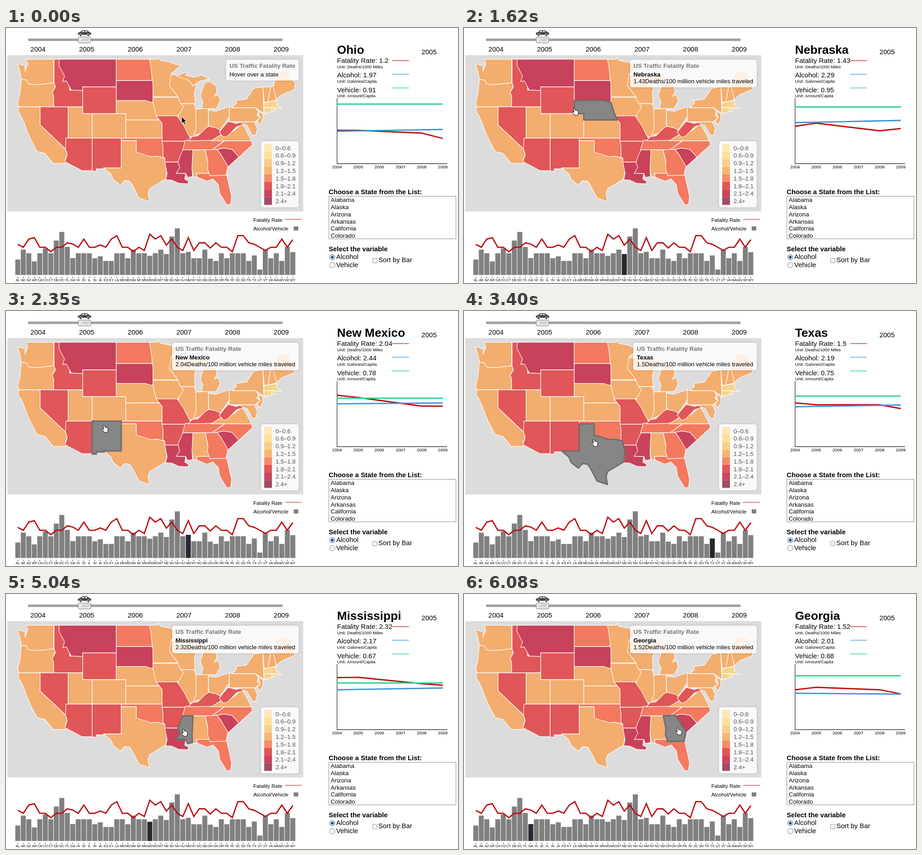
These frames come from a looping animation (996 by 563 pixels, 8000 ms). An HTML page:

```html
<!DOCTYPE html>
<html lang="en">
<head>
<meta charset="utf-8">
<title>US Traffic Fatality Rate</title>
<style>
html, body { margin: 0; width: 100%; height: 100%; overflow: hidden; background: #fff; }
body, svg text { font-family: "Liberation Sans", Arial, sans-serif; }
#stage { position: absolute; left: 0; top: 0; width: 996px; height: 563px; overflow: hidden; }
svg { position: absolute; left: 0; top: 0; }
.panel { position: absolute; right: 351px; background: rgba(255,255,255,.82); border-radius: 5px;
  box-shadow: 0 0 5px rgba(0,0,0,.16); }
#tip { top: 70px; padding: 5.5px 7.7px; font-size: 13.2px; line-height: 15px; white-space: nowrap; }
#tip h4 { margin: 0 0 4.7px; font-size: 13.3px; color: #777; }
#key { top: 250px; left: 562px; height: 146px; width: 83px; }
</style>
</head>
<body>
<div id="stage">
<svg id="back" width="996" height="563"></svg>
<div class="panel" id="tip"></div>
<div class="panel" id="key"></div>
<svg id="front" width="996" height="563"></svg>
</div>
<script>
const $ = id => document.getElementById(id);
const back = $('back'), front = $('front');

function add(parent, tag, attrs, content) {
  const el = document.createElementNS('http://www.w3.org/2000/svg', tag);
  for (const k in attrs) el.setAttribute(k, attrs[k]);
  if (content !== undefined) el.textContent = content;
  parent.appendChild(el);
  return el;
}
const text = (x, y, size, str, more) => add(front, 'text', { x, y, 'font-size': size, ...more }, str);
const line = (x1, y1, x2, y2, stroke, w = 1) =>
  add(front, 'line', { x1, y1, x2, y2, stroke, 'stroke-width': w });
const rect = (parent, x, y, width, height, fill, more) =>
  add(parent, 'rect', { x, y, width, height, fill, ...more });
const curve = (stroke, points = '') =>
  add(front, 'polyline', { points, fill: 'none', stroke, 'stroke-width': 2.8 });
const bold = { 'font-weight': 'bold' }, mid = { 'text-anchor': 'middle' };
const mix = (a, b, p) => a + (b - a) * p;

// ---- map: rate class, then outline; later states overlap the rough inner edges of earlier ones
const classes = { O: ['#f3ad6e', 1.26], C: ['#f3795f', 1.62], R: ['#e15658', 1.92], D: ['#c7425a', 2.2], Y: ['#f5d48c', .9] };
const states = {
  OR: 'O34 110H105L108 130 102 142 105 150V174H28L26 164 31 145',
  WA: 'O25 79L42 84V96L48 79 44 69H105V121L78 124 62 125 49 123 46 115 34 113 30 93',
  NV: 'R75 174H137V241L131 267 75 214',
  CA: 'O28 174H75V214L131 267 135 279 131 288 132 299H104L86 277 69 273 55 247 46 226 39 207 33 194 27 185',
  ID: 'R106 69H140V137H169V174H105V150L102 142 109 130 106 121',
  MT: 'D117 69H243V130H169V138L144 137 133 117 125 118 129 106 117 83',
  WY: 'R169 130H243V189H169',
  UT: 'O137 174H169V189H190V243H137',
  CO: 'O190 189H264V243H190',
  AZ: 'R137 243H190V315H168L130 295 135 279 131 267 132 243',
  NM: 'R190 243H254V309H215L217 311H199V316H190',
  ND: 'C243 69H322V116H243',
  SD: 'D243 116H324V164H243',
  NE: 'O243 160H308L324 165 331 188 338 203H264V189H243',
  KS: 'O264 203H338L344 211V243H264',
  OK: 'C254 243H344L346 262V287H287V249H254',
  TX: 'O254 249H287V274L307 280 319 284 333 283 349 287 355 313 352 333 329 347 317 354 313 365 316 383 293 375 278 346 272 338 261 337 252 347 236 334 231 322 215 309H254',
  WI: 'O358 103H374L403 114 412 128 421 121 415 142 417 167H380L358 130',
  MN: 'O316 69H335L336 64 340 71 360 75 372 80 386 82 364 101 360 127 379 152H324V128L319 84',
  IL: 'O380 167H414L419 179V240H400L380 205',
  IA: 'O324 153H379L382 162 391 174 382 190 377 195H331L324 165',
  MO: 'R331 194H377L392 216 402 236 408 246 404 256H396V250H344V211',
  AR: 'R344 250H397L402 257 389 278 380 296H350V287L346 285V262',
  LA: 'D350 296H385V321H396L394 334 402 338 401 344 381 343 366 336 352 335 355 321',
  IN: 'O418 179L446 177V222L432 231 413 237 419 222',
  OH: 'O446 181L463 184 492 174V196L470 228 447 222',
  MI: 'O437 122L449 118 462 127 465 140 459 151 468 147 472 161 463 178H431L434 163 428 150',
  UP: 'O376 107L398 96 396 104 415 109 432 104 448 113 428 117 412 127 400 114',
  TN: 'C395 248H482L454 269H389',
  KY: 'R402 249L410 240 423 238 439 222 447 217 461 220 470 224 476 234 454 248',
  FL: 'C419 318H485L497 372 495 389 487 391 471 365 468 346 456 333 443 338 421 329',
  MS: 'D390 269H412L410 310 411 328 400 330 396 321H375L383 308 379 296 383 284',
  AL: 'O412 269H439L447 308V321H419L421 329H413L410 310',
  NC: 'C454 269L482 249H541L543 258 523 276 513 286H465',
  SC: 'D465 268L480 265 498 268 513 285 489 307 474 280',
  GA: 'C439 269L465 268 474 280 489 305 485 325 449 326 444 310 445 296',
  VA: 'O452 249L470 238 501 228 520 212 528 224 541 249',
  WV: 'R470 230L480 217 490 206 508 211 519 207 523 213 508 218 489 238 479 241',
  MD: 'O505 207H547L554 222 550 237H543L531 215 513 208',
  NJ: 'O556 184L566 189V201L560 214 553 206 560 198',
  NY: 'O498 176L508 166 506 160 530 157 546 133 566 130 568 186 588 182 571 190 550 176',
  PA: 'O492 174L498 176H550L556 185 553 193 560 198 549 207H492',
  VT: 'O566 130H583L577 164H569',
  NH: 'O583 131L589 126 596 159 577 164',
  ME: 'O589 130L598 96 615 94 625 98 628 112 638 122 635 136 608 147 596 158',
  MA: 'Y568 165L596 160V170L607 178 592 176H568',
  CT: 'Y568 176H586V184L569 189',
  RI: 'Y586 176H592V183L586 184'
};
const outline = id => 'M' + states[id].slice(1) + 'Z';
const classOf = id => classes[(states[id] || 'O')[0]];
rect(back, 3, 60, 652, 345, '#dcdcdc');
for (const id in states)
  add(back, 'path', { d: outline(id), fill: classOf(id)[0], stroke: '#fff', 'stroke-width': 1.3,
    'stroke-opacity': .9, 'stroke-linejoin': 'round' });
const hot = add(back, 'path', { fill: '#868686', stroke: '#6d6d6d', 'stroke-width': 3, 'stroke-linejoin': 'round' });

// ---- colour key
['#fee8b9', '#fee197', '#f5cf8e', '#f6b673', '#f58c6a', '#e25657', '#cb455e', '#a44b64'].forEach((color, i, all) => {
  const low = i && (.3 + .3 * i).toFixed(1), high = (.6 + .3 * i).toFixed(1);
  rect(front, 569, 256 + 16.8 * i, 17, 16.9, color);
  text(594, 269.5 + 16.8 * i, 13.2, i < all.length - 1 ? `${low}–${high}` : low + '+', { fill: '#555' });
});

// ---- year slider with car
rect(front, 49.5, 24, 559, 4, '#aaa', { stroke: '#666', 'stroke-width': .8 });
rect(front, 159, 20, 28, 13, '#e8e8e8', { rx: 3, stroke: '#777' });
for (let x = 167; x < 180; x += 4) line(x, 29, x + 4, 23, '#888');
add(front, 'path', { fill: '#444', d: 'M159 15L158 11 163 9 168 5H178L184 9 188 11 187 15Z' });
add(front, 'path', { fill: '#fff', d: 'M166 9L169 6.5H172V9ZM174 9V6.5H177L180 9Z' });
for (const cx of [164.5, 181.5])
  add(front, 'circle', { cx, cy: 15.5, r: 2.8, fill: '#444', stroke: '#fff' });

const yearX = i => 729.5 + 46.6 * i;
for (let i = 0; i < 6; i++) {
  text(70.5 + 107.2 * i, 52, 15, 2004 + i, mid);
  text(yearX(i), 310, 9.6, 2004 + i, mid);
}

// ---- hovered states: 2005 figures, then heights of their three curves
const info = {
  OH: ['Ohio', [1.2, 1.97, .91], [226, 226, 232, 244], [228, 224], [168]],
  IA: ['Iowa', [1.45, 2.13, 1.13], [221, 209, 216, 221.5], [217, 206.5], [167.5]],
  NE: ['Nebraska', [1.43, 2.29, .95], [217, 210, 227, 222], [209, 204], [174.5]],
  WY: ['Wyoming', [1.88, 2.42, 1.24], [196, 195, 198, 204], [205, 200], [165]],
  CO: ['Colorado', [1.26, 2.68, .86], [219, 222, 227, 236], [197, 195], [183]],
  NM: ['New Mexico', [2.04, 2.44, .78], [186, 191, 210, 210], [205, 203], [192.5]],
  TX: ['Texas', [1.5, 2.19, .75], [203, 207, 207, 215.5], [211.5, 207.5], [188]],
  AR: ['Arkansas', [2.04, 1.78, .7], [187, 190, 197, 198], [231, 226], [194]],
  MS: ['Mississippi', [2.32, 2.17, .67], [184.5, 184, 198, 201.5], [211.5, 207.5], [196.5]],
  AL: ['Alabama', [1.49, 1.91, .97], [202, 207, 213, 220], [225, 221], [174]],
  GA: ['Georgia', [1.52, 2.01, .88], [211.5, 206, 211.5, 220.5], [219, 221], [180.5]]
};
const knots = { 4: [0, 1, 4, 5], 2: [0, 5], 1: [0, 5] };

// ---- bar chart: known figures where there are any, else a level for a group of states
const codes = ('AL AK AZ AR CA CO CT DE DC FL GA HI ID IL IN IA KS KY LA ME MD MA MI MN MS MO MT NE NV NH ' +
  'NJ NM NY NC ND OH OK OR PA RI SC SD TN TX UT VT VA WA WV WI WY').split(' ');
const levels = { 103: 'NH', 95: 'DC', 85: 'NV', 76: 'DE', 62: 'FL WI', 56: 'AK ND MT VT MA',
  37: 'IN NY NC PA VA MD', 31: 'KS KY OK TN WV', 12: 'UT' };
const safest = 'MN VT NJ NY';
const barHeight = id => info[id] ? 32 * info[id][1][1] - 27
  : +(Object.keys(levels).find(h => levels[h].includes(id)) || 48);
const rate = id => info[id] ? info[id][1][0] : safest.includes(id) ? 1 : classOf(id)[1];
const barX = i => 20.5 + 12.12 * i;
const bars = {};
codes.forEach((id, i) => {
  const x = barX(i), h = barHeight(id);
  bars[id] = rect(front, x, 545.3 - h, 11, h, '#808080');
  line(x + 5.5, 549, x + 5.5, 552.5, '#333');
  text(x + 5.5, 559, 7.4, id, mid);
});
curve('#b80d12', codes.map((id, i) => [barX(i) + 5.5, 518.5 - 27.3 * rate(id)]).join(' '));
text(545, 428, 11.4, 'Fatality Rate');
line(615, 422.5, 652, 422.5, '#d98080', 1.8);
text(545, 447, 11.4, 'Alcohol/Vehicle');
rect(front, 634, 438, 10, 9, '#808080');

// ---- side panel
const title = text(729.5, 57, 26.2, '', bold);
text(915.5, 57.5, 15.1, '2005');
const rows = [['Fatality Rate: ', 'Deaths/1000 Miles', '#e26a6a'], ['Alcohol: ', 'Galones/Capita', '#6fb3e6'],
  ['Vehicle: ', 'Amount/Capita', '#55d9a5']].map(([label, unit, color], i) => {
  const y = 77 + 32.3 * i;
  line(851, 72 + 30.2 * i, 888, 72 + 30.2 * i, color, 1.8);
  text(729.5, y + 11.7, 9.5, 'Unit: ' + unit);
  return { label, el: text(729.5, y, 15, '') };
});
line(729.5, 155, 729.5, 300, '#333', 1.3);
line(729, 299.5, 972, 299.5, '#333', 1.3);
const plots = ['#c00a10', '#3a93d6', '#33d48e'].map(color => curve(color));

text(711, 367, 14.8, 'Choose a State from the List:', bold);
rect(front, 711.5, 371.5, 280, 94, '#fff', { stroke: '#888' });
['Alabama', 'Alaska', 'Arizona', 'Arkansas', 'California', 'Colorado'].forEach((s, i) =>
  text(715.5, 384.3 + 15.75 * i, 13.2, s));
text(711, 493, 14.8, 'Select the variable', bold);
const dot = (cy, r, fill, stroke) => add(front, 'circle', { cx: 719, cy, r, fill, stroke });
dot(506, 6, '#a9d2f5', '#7c8794');
dot(506, 2.5, '#1b2a44', 'none');
dot(523.5, 6, '#f4f4f4', '#7c8794');
text(727.5, 510, 15, 'Alcohol');
text(727.5, 528, 15, 'Vehicle');
rect(front, 807.5, 508.5, 10, 10, '#f6f6f6', { rx: 2, stroke: '#888' });
text(820.5, 517, 14.9, 'Sort by Bar');

// ---- cursors
const arrow = add(front, 'path', { d: 'M0 0V14.5L3.4 11.5 6 17 8.6 15.8 6.2 10.5H10.6Z', fill: '#000', stroke: '#fff' });
const hand = add(front, 'path', { fill: '#fff', stroke: '#000', 'stroke-linejoin': 'round',
  d: 'M-3 -7Q-1-9 .2-6.5L1.2-3Q3-4.5 4-2.5Q5.6-3.6 6.4-1.7Q8-2 8 .5L7.4 4.5 6.5 8H-.2L-3.4 3.4Q-6 1-4.6-.4Q-3.4-.8-1.5 1.2Z' });

// ---- moves: start, number of steps, state reached, cursor position there
const LOOP = 8000, STEP = 145;
const moves = [
  [0, 1, 'OH', 387, 196], [280, 2, 'IA', 340, 173], [1020, 5, 'NE', 244, 185], [1760, 3, 'WY', 212, 181],
  [2200, 1, 'CO', 214, 217], [2350, 1, 'NM', 217, 260], [3100, 3, 'TX', 287, 291], [3850, 3, 'AR', 366, 276],
  [4450, 2, 'MS', 392, 306], [5190, 1, 'AL', 430, 302], [5790, 3, 'GA', 472, 303]
];

function show(t) {
  const n = moves.findLastIndex(m => m[0] <= t);
  const [start, count, id, x, y] = moves[n], [, , oldId, oldX, oldY] = moves[Math.max(n - 1, 0)];
  const step = Math.min(Math.floor((t - start) / STEP) + 1, count);
  const travel = step / count, blend = Math.min(1, step / Math.min(count, 2));
  const [name, values, ...series] = info[id], idle = n === 0;

  title.textContent = name;
  rows.forEach((r, i) => r.el.textContent = r.label + values[i]);
  plots.forEach((plot, i) => {
    const ys = series[i], old = info[oldId][i + 2];
    plot.setAttribute('points', knots[ys.length].map((k, j) =>
      [yearX(k), mix(old[j] ?? old[0], ys[j] ?? ys[0], blend)]).join(' '));
  });
  for (const code in bars) bars[code].setAttribute('fill', !idle && code === id ? '#2b2730' : '#808080');
  hot.setAttribute('d', idle ? '' : outline(id));
  $('tip').innerHTML = '<h4>US Traffic Fatality Rate</h4>' + (idle ? 'Hover over a state'
    : `<b>${name}</b><br>${values[0]}Deaths/100 million vehicle miles traveled`);
  const cursor = idle ? arrow : hand;
  arrow.style.display = hand.style.display = 'none';
  cursor.style.display = '';
  cursor.setAttribute('transform', `translate(${mix(oldX, x, travel)} ${mix(oldY, y, travel)})`);
}

function tick() {
  show(performance.now() % LOOP);
  requestAnimationFrame(tick);
}
tick();
</script>
</body>
</html>
```
